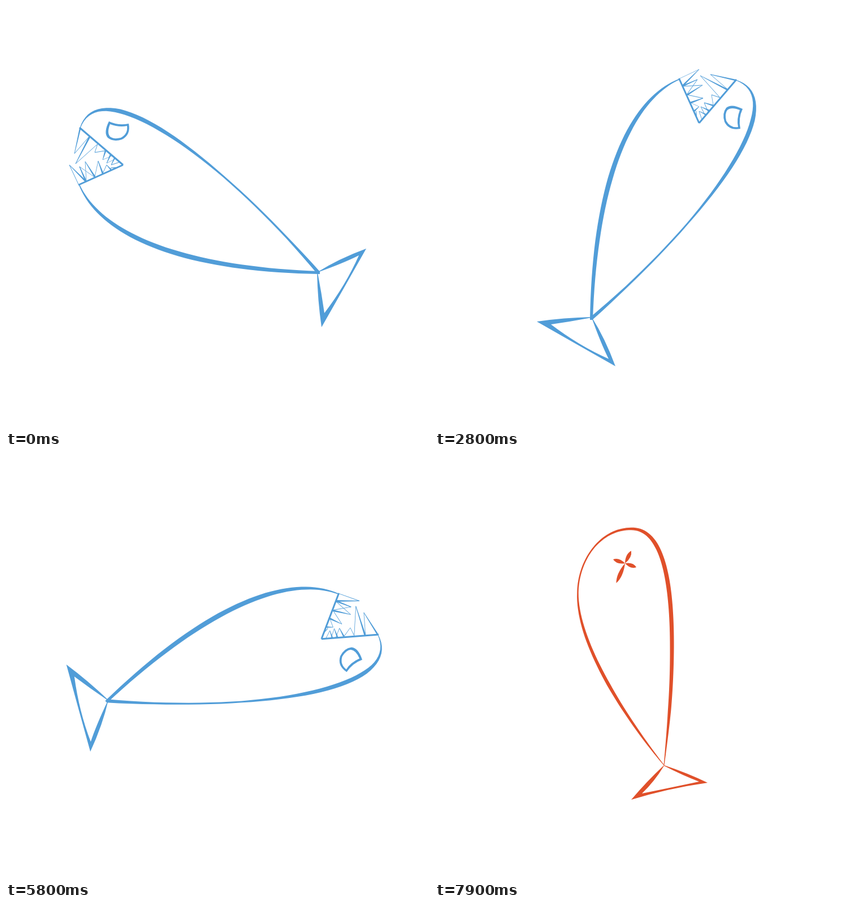
Write an HTML page with a canvas that moves like this. It is 748 px wide and 748 px high and loops after 8000 ms.

```html
<!DOCTYPE html>
<html lang="en">
<head>
<meta charset="utf-8">
<title>Two fish</title>
<style>
  html, body { margin: 0; width: 100%; height: 100%; overflow: hidden; background: #fff; }
  canvas { display: block; }
</style>
</head>
<body>
<canvas id="stage" width="748" height="748"></canvas>
<script>
const ctx = document.getElementById('stage').getContext('2d');
const BLUE = '#519dd8', RED = '#e0502a';
const LOOP = 8000, BEAT = 700, FLASH = 100;

// Value at t (0..1) on a polyline of evenly spaced values
function ramp(values, t) {
  const p = t * (values.length - 1), i = Math.min(Math.floor(p), values.length - 2);
  return values[i] + (values[i + 1] - values[i]) * (p - i);
}

// Brush stroke of varying width along chained cubics; p holds x, y pairs
function brush(path, p, widths) {
  const left = [], right = [], steps = 40;
  for (let s = 0; s + 7 < p.length; s += 6) {
    for (let i = s ? 1 : 0; i <= steps; i++) {
      const t = i / steps, u = 1 - t;
      const at = k => u * u * u * p[s + k] + 3 * u * u * t * p[s + k + 2] +
                      3 * u * t * t * p[s + k + 4] + t * t * t * p[s + k + 6];
      const slope = k => u * u * (p[s + k + 2] - p[s + k]) +
                         2 * u * t * (p[s + k + 4] - p[s + k + 2]) +
                         t * t * (p[s + k + 6] - p[s + k + 4]);
      const dx = slope(0), dy = slope(1);
      const h = ramp(widths[s / 6], t) / 2 / Math.hypot(dx, dy);
      left.push([at(0) - dy * h, at(1) + dx * h]);
      right.unshift([at(0) + dy * h, at(1) - dx * h]);
    }
  }
  polygon(path, left.concat(right));
}

function polygon(path, points) {
  points.forEach(([x, y], i) => i ? path.lineTo(x, y) : path.moveTo(x, y));
  path.closePath();
}

// Straight line whose width goes from w0 to w1
function taper(path, [x0, y0], [x1, y1], w0, w1) {
  const len = Math.hypot(x1 - x0, y1 - y0) * 2;
  const nx = (y0 - y1) / len, ny = (x1 - x0) / len;
  polygon(path, [[x0 + nx * w0, y0 + ny * w0], [x1 + nx * w1, y1 + ny * w1],
                 [x1 - nx * w1, y1 - ny * w1], [x0 - nx * w0, y0 - ny * w0]]);
}

// Leaf between two points
function petal(path, [x0, y0], [x1, y1], w) {
  const len = Math.hypot(x1 - x0, y1 - y0);
  const nx = (y0 - y1) / len * w, ny = (x1 - x0) / len * w;
  const mx = x0 + (x1 - x0) * .6, my = y0 + (y1 - y0) * .6;
  path.moveTo(x0, y0);
  path.quadraticCurveTo(mx + nx, my + ny, x1, y1);
  path.quadraticCurveTo(mx - nx, my - ny, x0, y0);
}

// Each fish is a list of paths filled one by one
function angryFish() {
  const body = new Path2D(), belly = new Path2D();
  brush(body, [131, 216, 165, 116, 365, 255, 553, 472], [[1, 3, 5, 7.5, 7.5, 6.5, 4.5, 3, 3, 3.5, 6]]);
  brush(belly, [129.5, 316, 165, 400, 300, 465, 555, 471.5], [[1.5, 5, 7.5, 8.5, 7.5, 5]]);

  const outline = new Path2D(
    'M550 471Q588 447 637 429Q598 498 558 568Q551 520 550 471Z' +
    'M551 471Q596 455 624 441Q601 493 563 543Q558 508 551 471Z' +
    'M182 204Q199 212 217 208Q221 228 205 236Q190 241 180 233Q172 224 182 204Z' +
    'M184 209Q200 215 214 212Q216 226 203 233Q190 236 184 231Q178 224 184 209Z');

  const paths = [body, belly, outline];
  const line = (a, b, w0, w1) => {
    const path = new Path2D();
    taper(path, a, b, w0, w1);
    paths.push(path);
  };
  const corner = [207, 281];
  line([130, 215], corner, 3, 3);
  line([128, 316.5], corner, 3, 3);

  // base, tip, base, width of the heavy edge
  const upper = [
    [131, 217, 121, 261, 147, 231, 2.6], [148, 231, 123, 279, 161, 245, 3],
    [162, 244, 157, 259, 175, 256, .8], [176, 256, 171, 272, 187, 265, 2.8],
    [185, 263, 178, 278, 194, 270, 2.6], [192, 269, 186, 281, 201, 276, 2.2]];
  const lower = [
    [128, 315, 112, 281, 141, 310, 3], [141, 310, 130, 284, 157, 303, .9],
    [141, 310, 130, 284, 141, 309, 3], [142, 309, 140, 275, 157, 302, 3],
    [157, 302, 163, 274, 171, 296, 3], [171, 296, 178, 281, 186, 290, 2.6],
    [184, 291, 186, 286, 196, 286, 2]];
  for (const [ax, ay, tx, ty, bx, by, w] of upper) {
    line([ax, ay], [tx, ty], w, .8);
    line([tx, ty], [bx, by], .8, .8);
  }
  for (const [ax, ay, tx, ty, bx, by, w] of lower) {
    line([ax, ay], [tx, ty], .8, .8);
    line([tx, ty], [bx, by], .8, w);
  }
  return paths;
}

function deadFish() {
  const body = new Path2D(), eye = new Path2D();
  brush(body,
    [405, 545, 350, 478, 250, 335, 252.5, 240, 253, 185, 290, 127, 347, 127,
     403, 126, 419, 220, 419, 335, 419, 420, 412, 480, 405, 545],
    [[1, 4, 6, 5, 2.5], [2.5, 2.5, 4.5], [4.5, 7, 7.5, 7], [7, 5.5, 1]]);
  const tail = new Path2D(
    'M405 545Q447 559 482 576Q412 586 347 606Q374 574 405 545Z' +
    'M405 546Q438 563 467 574Q420 584 366 595Q388 574 405 546Z');
  for (const tip of [[347, 166], [315, 181], [356, 195], [320.5, 223]]) {
    petal(eye, [336, 188], tip, 7);
  }
  return [body, tail, eye];
}

const blueFish = angryFish(), redFish = deadFish();

function drawFish(paths, color, cx, cy, degrees) {
  ctx.save();
  ctx.translate(cx, cy);
  ctx.rotate(degrees * Math.PI / 180);
  // each fish is drawn around its own resting centre
  ctx.translate(paths === redFish ? -374.2 : -374, paths === redFish ? -379.3 : -374);
  ctx.fillStyle = color;
  for (const path of paths) ctx.fill(path, path === paths[0] ? 'nonzero' : 'evenodd');
  ctx.restore();
}

function render(now) {
  const t = now % LOOP;
  // two flashes, then a hold in every beat; the fish take turns
  const step = Math.floor(t / BEAT) * 3 + Math.min(2, Math.floor(t % BEAT / FLASH));
  const d = step - 20, gap = Math.abs(d), side = Math.sign(d);
  ctx.clearRect(0, 0, 748, 748);
  if (step % 2) {
    drawFish(redFish, RED, 374.2, step < 27 ? 372.5 : 379.3, 105 - side * 7.5 * (gap - 1));
  } else {
    // the turn slows down around the middle of the loop
    const turns = Math.max(gap / 2 - 2, gap > 2 ? 1 : 0);
    drawFish(blueFish, BLUE, 374, 374, 120 + side * 15 * turns);
  }
}

const start = performance.now();
function tick() {
  render(performance.now() - start);
  requestAnimationFrame(tick);
}
tick();
</script>
</body>
</html>
```
